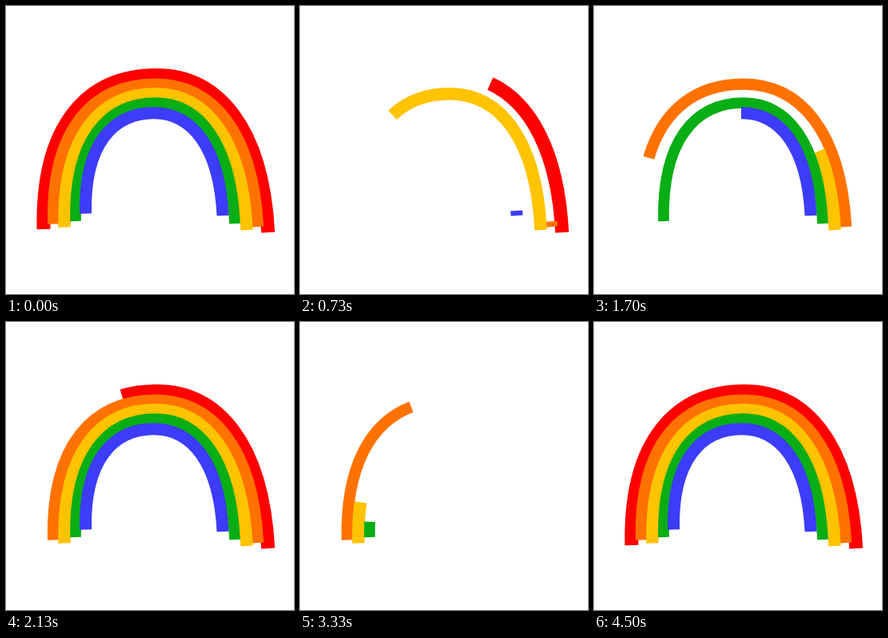
Recreate the animation shown at these times as an HTML page with a canvas. Size 360 by 360 pixels, loop 4.53 s.

```html
<!DOCTYPE html>
<html lang="en">
<head>
<meta charset="utf-8">
<title>Rainbow</title>
<style>
  html, body { margin: 0; width: 100%; height: 100%; overflow: hidden; background: #fff; }
  canvas { display: block; width: 360px; height: 360px; }
</style>
</head>
<body>
<canvas id="stage"></canvas>
<script>
const SIZE = 360;
const LOOP = 4530;
const SWEEP = 500;

// starts: wipe away rightward, grow back leftward, wipe away leftward, grow back rightward
const bands = [
  { color: '#ff0000', width: 17, left: [47, 279], top: [188, 86.5], right: [327.6, 283], starts: [432, 1842, 2607, 3764] },
  { color: '#ff7200', width: 14.3, left: [59, 272.5], top: [187, 97.7], right: [315, 276], starts: [238, 1286, 2364, 3130] },
  { color: '#ffc300', width: 15.5, left: [73, 276.5], top: [187, 109.8], right: [301, 280], starts: [566, 1590, 2230, 3275] },
  { color: '#08ae14', width: 13.7, left: [87, 269], top: [187, 121], right: [286, 272], starts: [140, 1145, 2160, 3307] },
  { color: '#3c3cfa', width: 15, left: [99.5, 259.5], top: [185, 133.7], right: [271, 262], starts: [240, 1450, 2520, 3603] }
];

function archPath({ left: [lx, ly], top: [tx, ty], right: [rx, ry] }) {
  const lw = tx - lx, lh = ly - ty, rw = rx - tx, rh = ry - ty;
  return `M${lx} ${ly}` +
    `C${lx - 0.02 * lw} ${ly - 0.68 * lh} ${tx - 0.61 * lw} ${ty} ${tx} ${ty}` +
    `C${tx + 0.55 * rw} ${ty} ${rx - 0.05 * rw} ${ry - 0.67 * rh} ${rx} ${ry}`;
}

for (const band of bands) {
  const d = archPath(band);
  const el = document.createElementNS('http://www.w3.org/2000/svg', 'path');
  el.setAttribute('d', d);
  band.length = el.getTotalLength();
  band.path = new Path2D(d);
}

const canvas = document.getElementById('stage');
const ctx = canvas.getContext('2d');
const scale = window.devicePixelRatio || 1;
canvas.width = canvas.height = Math.round(SIZE * scale);
ctx.scale(scale, scale);

const progress = (t, start) => Math.min(1, Math.max(0, (t - start) / SWEEP));

function drawBand(band, t) {
  const [hideA, showA, hideB, showB] = band.starts.map(start => progress(t, start));
  const from = hideA - showA;
  const to = 1 - hideB + showB;
  if (to - from < 0.001) return;
  const len = band.length;
  const visible = (to - from) * len + (to === 1 ? 2 : 0);
  ctx.setLineDash([visible, 2 * len]);
  ctx.lineDashOffset = -from * len;
  ctx.lineWidth = band.width;
  ctx.strokeStyle = band.color;
  ctx.stroke(band.path);
}

function draw(t) {
  ctx.fillStyle = '#fff';
  ctx.fillRect(0, 0, SIZE, SIZE);
  for (const band of bands) drawBand(band, t);
}

const begin = performance.now();
function tick() {
  draw((performance.now() - begin) % LOOP);
  requestAnimationFrame(tick);
}
tick();
</script>
</body>
</html>
```
